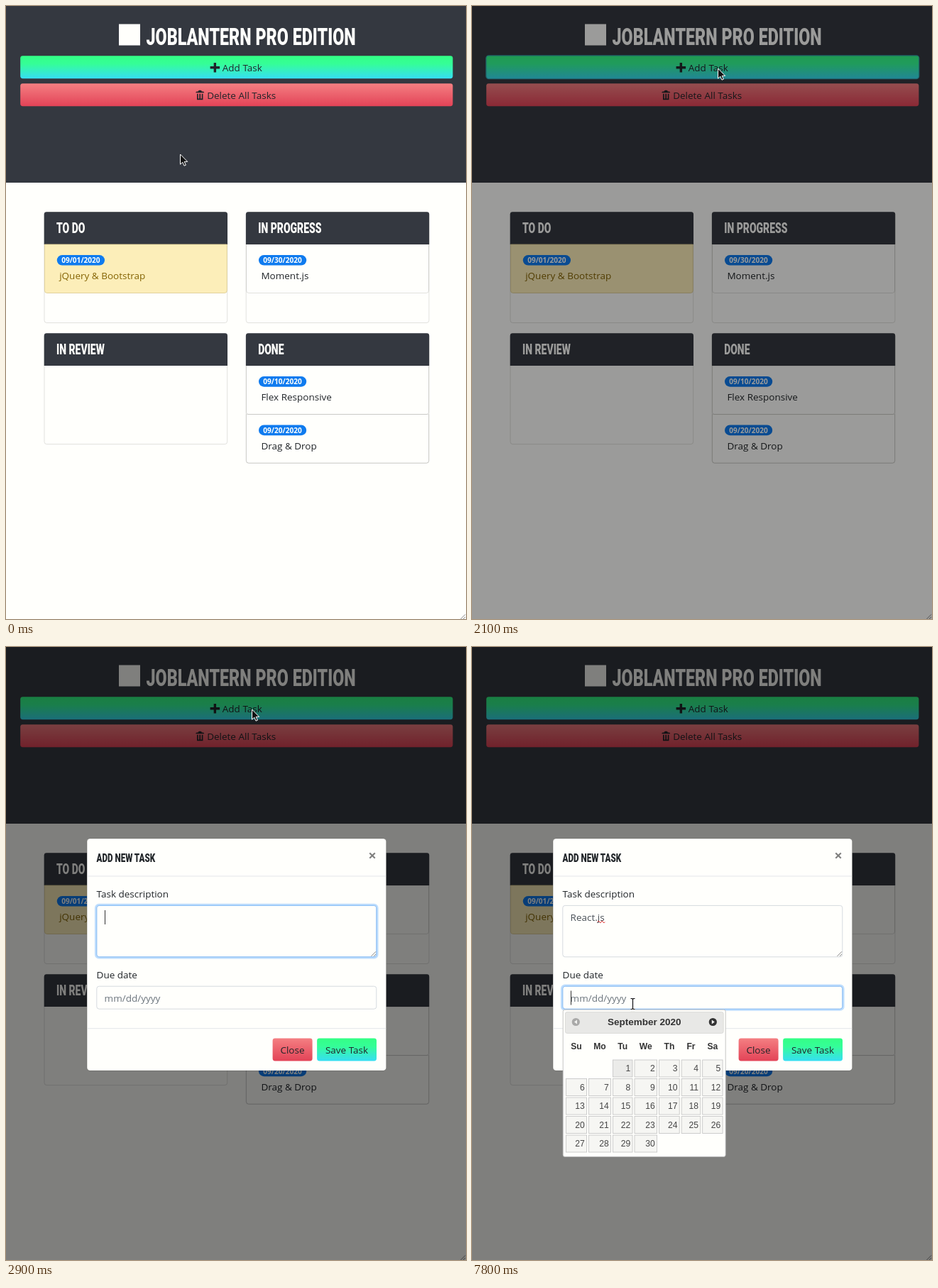
An HTML page that plays this animation: 648x864 px, repeating every 8000 ms.

```html
<!DOCTYPE html>
<html lang="en">
<head>
<meta charset="utf-8">
<title>Task board</title>
<style>
  html, body { margin: 0; width: 100%; height: 100%; overflow: hidden; background: #fffffc; }
  svg { display: block; width: 648px; height: 864px; }
  text { font: 13.5px "Open Sans", "Noto Sans", sans-serif; fill: #212529; white-space: pre; }
  .head { font-family: Roboto, "Open Sans", sans-serif; font-weight: 900; fill: #fffffc; }
  .badge { font-size: 10.125px; font-weight: 700; fill: #fffffc; }
  .cal { font-family: "Liberation Sans", Arial, sans-serif; fill: #333; }
  .bold { font-weight: 700; }
  .day { font-size: 12.15px; fill: #454545; }
  .mid { text-anchor: middle; }
  .end { text-anchor: end; }
  .field { fill: #fffffc; stroke: #ced4da; stroke-width: .85; }
  .glow { fill: none; stroke: #80bdff; stroke-width: .85; }
  .halo { fill: none; stroke: #007bff; stroke-opacity: .25; stroke-width: 2.7; }
  .line { fill: none; stroke: #000; stroke-opacity: .14; stroke-width: .85; }
</style>
</head>
<body>
<svg id="stage" viewBox="0 0 648 864" xmlns="http://www.w3.org/2000/svg"></svg>
<script>
const LOOP = 8000, STEP = 100;
const DARK = '#343840', PAPER = '#fffffc';

const text = (x, y, s, cls = '', extra = '') =>
  `<text x="${x}" y="${y}" class="${cls}" ${extra}>${s}</text>`;
const rect = (x, y, w, h, r, attrs) =>
  `<rect x="${x}" y="${y}" width="${w}" height="${h}" rx="${r}" ${attrs}/>`;
const path = (d, attrs) => `<path d="${d}" ${attrs}/>`;
const group = (id, inner) => `<g id="${id}">${inner}</g>`;

// One condensed heading style, the same factor for every heading
const heading = (x, y, size, s, fill = PAPER) =>
  `<text class="head" transform="translate(${x} ${y}) scale(.69 1)" style="font-size:${size}px;fill:${fill}">${s}</text>`;

const gradient = (id, stops) =>
  `<linearGradient id="${id}" x2="0" y2="1">` +
  stops.map(([o, c]) => `<stop offset="${o}" stop-color="${c}"/>`).join('') + '</linearGradient>';

const button = (x, y, w, fill) => rect(x, y, w, 32, 3.4, `fill="url(#${fill})"`);

const grip = (x, y, s) =>
  path(`M${x - s} ${y}L${x} ${y - s}M${x - s * .45} ${y}L${x} ${y - s * .45}`,
    'stroke="#777" stroke-width=".9" fill="none"');

const topRound = (x, y, w, h) =>
  path(`M${x} ${y + h}v${-h + 3.4}q0-3.4 3.4-3.4h${w - 6.8}q3.4 0 3.4 3.4v${h - 3.4}z`, `fill="${DARK}"`);

const bottomRound = (x, y, w, h, attrs) =>
  path(`M${x} ${y}v${h - 3.4}q0 3.4 3.4 3.4h${w - 6.8}q3.4 0 3.4-3.4v${-h + 3.4}z`, attrs);

function task(x, y, date, label, late) {
  const look = late ? 'fill="#fceeb9" stroke="#dccb93" stroke-width=".85"' : 'class="line"';
  return bottomRound(x + .4, y, 256.9, 68.5, look) +
    rect(x + 17.8, y + 15, 67.2, 14.6, 7.3, 'fill="#0f7bef"') +
    text(x + 51.4, y + 25.9, date, 'badge mid') +
    text(x + 21.2, y + 49.2, label, '', late ? 'style="fill:#856404"' : '');
}

function card(x, y, h, name, tasks) {
  return rect(x, y, 257.7, h, 3.4, 'class="line"') +
    topRound(x - .3, y - .3, 258.3, 45.8) +
    heading(x + 17, y + 29.1, 20.25, name) +
    tasks.map((t, i) => task(x, y + 45.5 + i * 68.5, ...t)).join('');
}

const TRASH = 'M3 0Q2 0 2 1H1Q0 1 0 2H7Q7 1 6 1H5Q5 0 4 0ZM1 3V8H6V3H5V6.5Q5 7 4.5 7T4 6.5V3H3V6.5Q3 7 2.5 7T2 6.5V3Z';
const PLUS = 'M3 0V3H0V5H3V8H5V5H8V3H5V0Z';
const icon = (d, x, y) => path(d, `transform="translate(${x} ${y}) scale(1.69)" fill="#212529"`);

const page =
  rect(0, 0, 648, 864, 0, `fill="${PAPER}"`) +
  rect(0, 0, 648, 249, 0, `fill="${DARK}"`) +
  rect(159, 25.5, 30, 30, 0, `fill="${PAPER}"`) +
  heading(197.5, 54.5, 33.75, 'JOBLANTERN PRO EDITION') +
  button(20.2, 70.2, 609.2, 'green') + icon(PLUS, 287.6, 80) + text(304.8, 91.8, 'Add Task') +
  button(20.2, 109.2, 609.2, 'red') + icon(TRASH, 267.3, 118.8) + text(283.2, 130.8, 'Delete All Tasks') +
  card(54, 290.5, 156, 'TO DO', [['09/01/2020', 'jQuery &amp; Bootstrap', true]]) +
  card(338.2, 290.5, 156, 'IN PROGRESS', [['09/30/2020', 'Moment.js']]) +
  card(54, 461.6, 156, 'IN REVIEW', []) +
  card(338.2, 461.6, 182.8, 'DONE', [['09/10/2020', 'Flex Responsive'], ['09/20/2020', 'Drag &amp; Drop']]) +
  grip(647, 864, 6.5);

const focusRing = (id, y, h) => group(id,
  rect(126.3, y - 1.3, 396.9, h + 2.6, 4.6, 'class="halo"') +
  rect(127.8, y, 394, h, 3.4, 'class="glow"'));

const modal =
  rect(114.1, 270.1, 421.5, 327, 4.2, `fill="${PAPER}" stroke="#000" stroke-opacity=".2" stroke-width=".85"`) +
  heading(127.6, 302.6, 16.875, 'ADD NEW TASK', '#212529') +
  text(516, 301.4, '×', 'bold mid', 'style="font-size:20.25px;fill:#7f7f7e"') +
  path('M114.5 323H535.2M114.5 537.7H535.2', 'stroke="#dee2e6" stroke-width=".85"') +
  text(127.6, 353.3, 'Task description') +
  rect(127.8, 364.4, 394, 72.4, 3.4, 'class="field"') +
  focusRing('areaRing', 364.4, 72.4) + grip(521, 435.8, 6.5) +
  text(138.6, 385.9, '', '', 'id="typed" style="fill:#495057"') +
  path('M177 387.5q1.25-3 2.5 0t2.5 0t2.5 0t2.5 0', 'id="squiggle" fill="none" stroke="#d22" stroke-width="1"') +
  text(127.6, 466.6, 'Due date') +
  rect(127.8, 478.2, 394, 32, 3.4, 'class="field"') +
  focusRing('dateRing', 478.2, 32) +
  text(138.6, 499.6, 'mm/dd/yyyy', '', 'style="fill:#6c757d"') +
  button(375.6, 551.5, 56, 'red') + text(403.5, 573.2, 'Close', 'mid') +
  button(438.1, 551.5, 83.9, 'green') + text(480, 573.2, 'Save Task', 'mid') +
  rect(139, 371, 1, 20, 0, 'id="caret" fill="#333"');

// Calendar columns: name, left, right
const COLS = [['Su', 132, 162], ['Mo', 164, 196], ['Tu', 198, 226.4], ['We', 228.6, 261],
  ['Th', 263.2, 292.6], ['Fr', 294.8, 322.2], ['Sa', 324.3, 353.5]];

function calendar() {
  let out = rect(128.2, 511.2, 229, 207.2, 2.6, `fill="${PAPER}" stroke="#bbb" stroke-width=".85"`) +
    rect(131.4, 514.4, 222.8, 30, 2.6, 'fill="#e8e8e6" stroke="#d8d8d6" stroke-width=".85"') +
    text(242.8, 533.4, 'September 2020', 'cal bold mid') +
    '<circle cx="146.3" cy="528.5" r="5.6" fill="#a9a9a8"/><circle cx="339.3" cy="528.5" r="5.6" fill="#333"/>' +
    path('M148 525.5v6l-4-3zM337.8 525.5v6l4-3z', 'fill="#f2f2f0"');
  for (const [name, a, b] of COLS) out += text((a + b) / 2, 566.9, name, 'cal bold mid', 'style="font-size:12.15px"');
  for (let d = 1; d <= 30; d++) {
    const cell = d + 1, [, a, b] = COLS[cell % 7], y = 582 + Math.floor(cell / 7) * 26.5;
    out += rect(a + .4, y, b - a - .8, 24, 0, `fill="${d === 1 ? '#ebebe9' : '#f6f6f3'}" stroke="#c5c5c5" stroke-width=".85"`) +
      text(b - 3.2, y + 16.4, d, 'cal day end');
  }
  return out;
}

const cursors =
  path('M0 0V14.2L3.3 11.2L5.5 16.2L7.9 15.2L5.7 10.4H10.2Z',
    'id="arrow" fill="#111" stroke="#fff" stroke-width="1" stroke-linejoin="round"') +
  group('beam', ['#fff', '#111'].map((c, i) =>
    path('M-3-7.5H-1L0-6.5L1-7.5H3M-3 7.5H-1L0 6.5L1 7.5H3M0-6.5V6.5', `fill="none" stroke="${c}" stroke-width="${i ? 1.2 : 2.8}"`)).join(''));

document.getElementById('stage').innerHTML =
  '<defs>' +
  gradient('green', [[0, '#33ff85'], [.35, '#35fe97'], [1, '#36def3']]) +
  gradient('red', [[0, '#f47f82'], [1, '#e34357']]) +
  '<clipPath id="calClip"><rect id="calBox" x="127" y="510"/></clipPath></defs>' +
  page +
  rect(0, 0, 648, 864, 0, 'id="shade" fill="#000"') +
  rect(19.8, 69.8, 610, 32.8, 3.8, 'id="addRing" fill="none" stroke="#1f7f86" stroke-width="1.2"') +
  group('modal', modal) +
  `<g id="calendar" clip-path="url(#calClip)">${calendar()}</g>` + cursors;

const el = id => document.getElementById(id);
const set = (id, name, value) => el(id).setAttribute(name, value);
const fade = (id, v) => set(id, 'opacity', v);
const ramp = (t, a, b) => Math.min(1, Math.max(0, (t - a) / (b - a)));
const easeOut = p => 1 - Math.pow(1 - p, 1.7);
const swing = p => .5 - Math.cos(p * Math.PI) / 2;

// Time a character count is reached
const KEYS = [4100, 4300, 4400, 4800, 5300, 5600, 6000, 6100];
// time, x, y
const MOVE = [[6500, 346.5, 88], [6600, 419, 109], [6800, 425, 215], [7000, 365, 345], [7200, 268, 460], [7400, 226.5, 503]];

function pointer(t) {
  if (t < 1500) {
    const p = swing(ramp(t, 500, 1400));
    return [245.5 + 96 * p, 209 - 117.5 * p];
  }
  const i = MOVE.findIndex(m => m[0] > t);
  if (i === 0) return MOVE[0].slice(1);
  if (i < 0) return MOVE[MOVE.length - 1].slice(1);
  const [a, x, y] = MOVE[i - 1], [b, u, v] = MOVE[i], p = ramp(t, a, b);
  return [x + (u - x) * p, y + (v - y) * p];
}

function draw(t) {
  fade('shade', .5 * ramp(t, 1982, 2132));
  fade('addRing', t >= 2100 && t < 2900 ? .7 : 0);

  fade('modal', ramp(t, 2155, 2305));
  set('modal', 'transform', `translate(0 ${-42.2 * (1 - easeOut(ramp(t, 2155, 2455)))})`);

  const dateFocus = ramp(t, 7540, 7690);
  fade('areaRing', ramp(t, 2440, 2590) * (1 - dateFocus));
  fade('dateRing', dateFocus);
  fade('squiggle', t >= 7600 ? 1 : 0);

  const typed = el('typed');
  typed.textContent = 'React.js'.slice(0, KEYS.filter(k => k <= t).length);
  const onDate = t >= 7600;
  const blink = (t >= 2500 && t < 3700) || (t >= 4100 && t < 6600) || onDate;
  fade('caret', blink ? 1 : 0);
  set('caret', 'x', onDate || t < 4100 ? 139 : 138.8 + typed.getComputedTextLength());
  set('caret', 'y', onDate ? 484.5 : 371);

  const open = swing(ramp(t, 7600, 7800));
  fade('calendar', open);
  set('calBox', 'width', 232 * open);
  set('calBox', 'height', 210 * open);

  const [x, y] = pointer(t);
  const overField = t > 6600 && ((y > 364 && y < 437) || (y > 478 && y < 510));
  for (const id of ['arrow', 'beam']) set(id, 'transform', `translate(${x} ${y})`);
  fade('arrow', overField ? 0 : 1);
  fade('beam', overField ? 1 : 0);
}

function tick(now) {
  draw(Math.floor((now % LOOP) / STEP) * STEP);
  requestAnimationFrame(tick);
}
draw(0);
requestAnimationFrame(tick);
</script>
</body>
</html>
```
